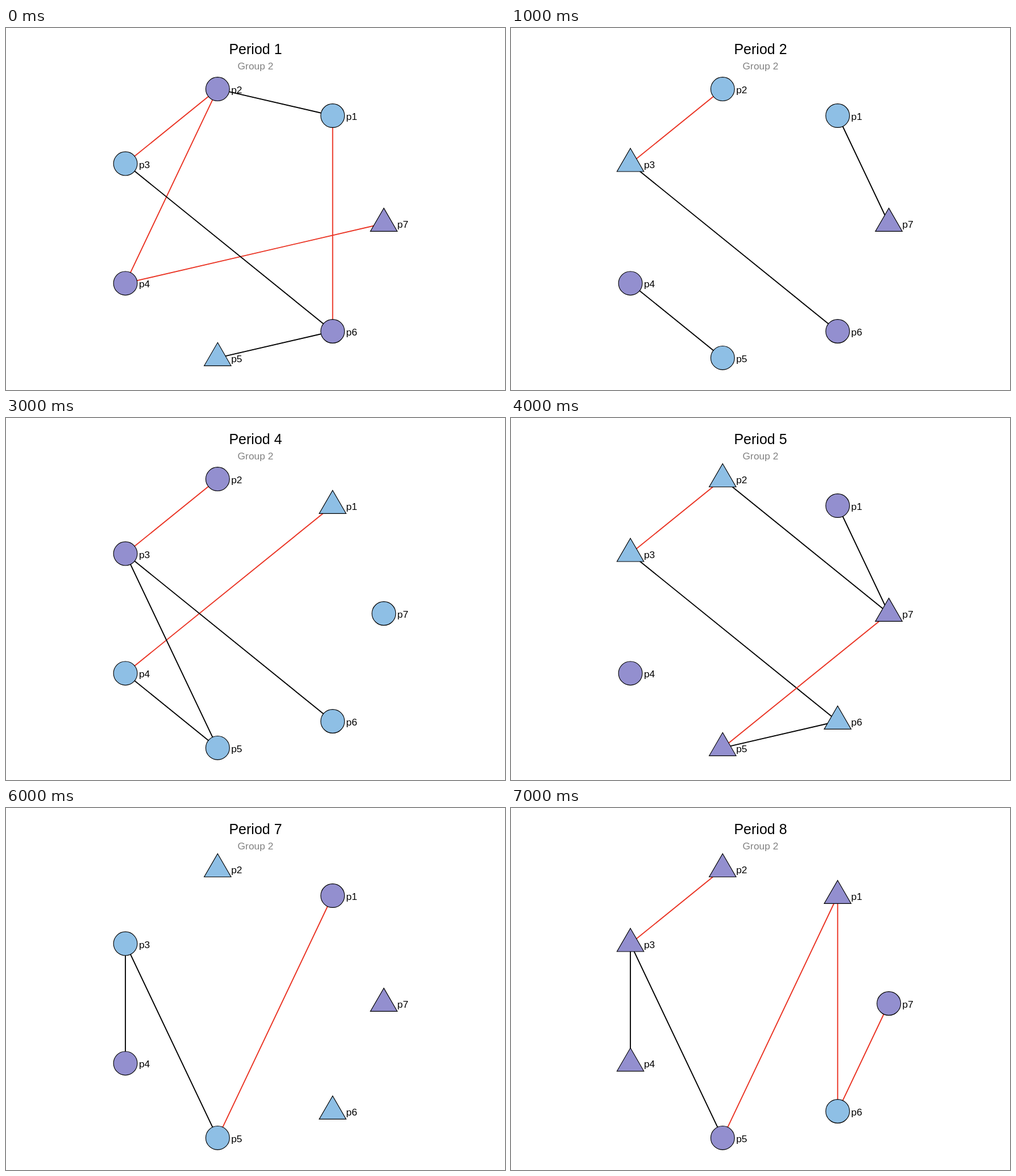
Recreate the animation shown at these times as an HTML page. Size 878 by 638 pixels, loop 8 s.

```html
<!DOCTYPE html>
<html lang="en">
<head>
<meta charset="utf-8">
<title>Network by period</title>
<style>
html, body { margin: 0; width: 100%; height: 100%; overflow: hidden; background: #fff; }
svg { display: block; width: 878px; height: 638px; }
text { font-family: "Liberation Sans", Arial, sans-serif; font-size: 17.4px; }
.mid { text-anchor: middle; }
</style>
</head>
<body>
<svg viewBox="0 0 878 638">
  <rect width="878" height="638" fill="#fff"/>
  <g id="edges" stroke-width="1.9"></g>
  <g id="nodes" stroke="#000" stroke-width="1.15"></g>
  <g id="labels"></g>
  <text id="title" class="mid" x="439" y="46" style="font-size:25px"></text>
  <text class="mid" x="439" y="73" fill="#808080">Group 2</text>
</svg>
<script>
const STEP = 1000;
const FILL = { b: '#8ebfe5', p: '#938fcf' };
const RED = '14 15 16 23 24 25 37 47 57 67'.split(' ');

// One row per period: nodes p1 to p7, then the linked pairs.
// Capital = triangle, small = circle; B blue, P purple.
const PERIODS = [
  ['bpbpBpP', '12 23 24 16 47 36 56'],
  ['bbBpbpP', '17 45 23 36'],
  ['BBpBbpp', '25 14 16 17 37 67'],
  ['Bppbbbb', '23 14 35 36 45'],
  ['pBBpPBP', '23 27 17 36 57 56'],
  ['pBbBpBB', '27 14 15 34 35 46'],
  ['pBbpbBP', '15 34 35'],
  ['PPPPpbp', '23 34 35 15 16 67']
];

const $ = id => document.getElementById(id);

function place(n) {
  const a = n * 2 * Math.PI / 7;
  return [425.6 + 239.2 * Math.cos(a), 344.5 - 243 * Math.sin(a)];
}

function edge(pair) {
  const [x1, y1] = place(+pair[0]), [x2, y2] = place(+pair[1]);
  const color = RED.includes(pair) ? '#ea3323' : '#000';
  return `<line x1="${x1}" y1="${y1}" x2="${x2}" y2="${y2}" stroke="${color}"/>`;
}

function node(kind, i) {
  const [x, y] = place(i + 1), low = kind.toLowerCase();
  const fill = `fill="${FILL[low]}"`;
  return kind === low
    ? `<circle cx="${x}" cy="${y}" r="20.9" ${fill}/>`
    : `<path d="M${x} ${y - 27.1}l23.7 41h-47.4z" ${fill}/>`;
}

function label(n) {
  const [x, y] = place(n);
  return `<text x="${x + 23.8}" y="${y + 7.5}">p${n}</text>`;
}

$('labels').innerHTML = [1, 2, 3, 4, 5, 6, 7].map(label).join('');

let shown = -1;
function draw(ms) {
  const k = Math.floor(ms / STEP) % PERIODS.length;
  if (k === shown) return;
  shown = k;
  const [kinds, pairs] = PERIODS[k];
  $('title').textContent = 'Period ' + (k + 1);
  $('edges').innerHTML = pairs.split(' ').map(edge).join('');
  $('nodes').innerHTML = [...kinds].map(node).join('');
}

const start = performance.now();
function tick() {
  draw(performance.now() - start);
  requestAnimationFrame(tick);
}
tick();
</script>
</body>
</html>
```
